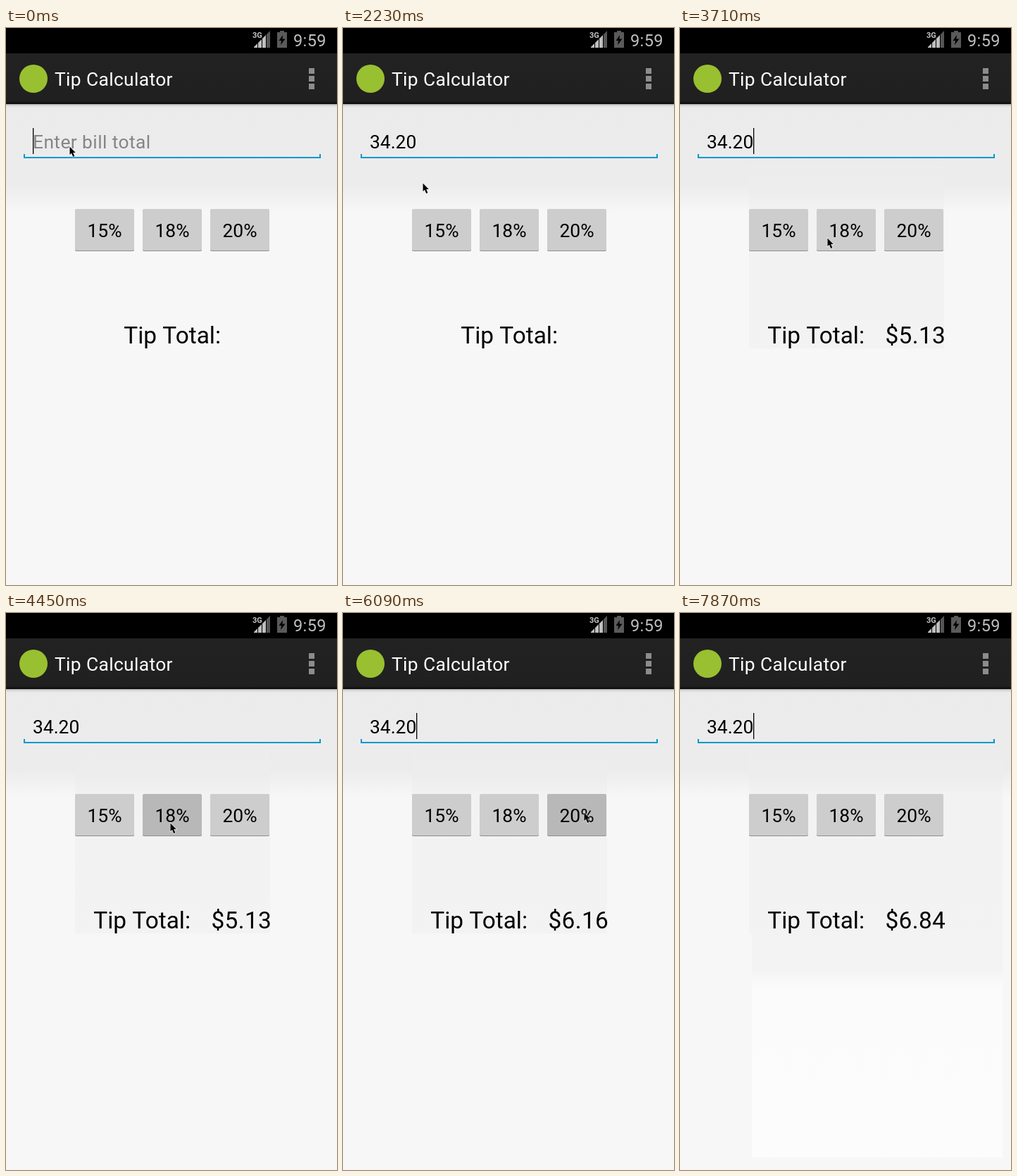
Recreate the animation shown at these times as an HTML page with a canvas. Size 470 by 791 pixels, loop 8370 ms.

```html
<!DOCTYPE html>
<html lang="en">
<head>
<meta charset="utf-8">
<title>Tip Calculator</title>
<style>
  html, body { margin: 0; width: 100%; height: 100%; overflow: hidden; background: #f7f7f7; }
  canvas { display: block; width: 470px; height: 791px; }
</style>
</head>
<body>
<canvas id="stage" width="470" height="791"></canvas>
<script>
const ctx = document.getElementById('stage').getContext('2d');
const LOOP = 8370, STEP = 148.55; // the screen refreshes once per step
const BILL = '34.20', RATES = [15, 18, 20];
const FIRST_PRESS = 19, PRESS_EVERY = 11;

// Pointer moves: start step, length, end point, easing power.
const START = { x: 90, y: 168 };
const MOVES = [
  { start: 13, len: 5, x: 147, y: 298, pow: 1 },
  { start: 24, len: 3, x: 233, y: 298, pow: 0.3 },
  { start: 34, len: 3, x: 342, y: 283, pow: 1.37 },
  { start: 45, len: 3, x: 438, y: 657, pow: 1 },
  { start: 49, len: 1, x: 448, y: 757, pow: 1 }
];
const LEAVE = 45, GONE = 51;

function pointerAt(step) {
  let { x, y } = START;
  for (const m of MOVES) {
    const p = Math.min(1, Math.max(0, (step - m.start) / m.len)) ** m.pow;
    x += (m.x - x) * p;
    y += (m.y - y) * p;
  }
  return { x: Math.round(x), y: Math.round(y) };
}

function typedAt(step) {
  if (step >= 12) return BILL;
  return BILL.slice(0, Math.max(0, Math.floor((step + 1) / 3)));
}

// The caret stays on while typing, then blinks in a cycle of seven steps.
const caretAt = step => step < 15 || (step - 15) % 7 >= 3;

function rect(color, x, y, w, h) {
  ctx.fillStyle = color;
  ctx.fillRect(x, y, w, h);
}

function roundRect(color, x, y, w, h, r) {
  ctx.fillStyle = color;
  ctx.beginPath();
  ctx.roundRect(x, y, w, h, r);
  ctx.fill();
}

function shade(y0, y1, ...stops) {
  const g = ctx.createLinearGradient(0, y0, 0, y1);
  for (const [y, color] of stops) g.addColorStop((y - y0) / (y1 - y0), color);
  return g;
}

function poly(points) {
  ctx.beginPath();
  points.forEach(([x, y]) => ctx.lineTo(x, y));
  ctx.closePath();
}

function setFont(size, spacing = 0, weight = 400) {
  ctx.font = `${weight} ${size}px Roboto, "Open Sans", sans-serif`;
  ctx.letterSpacing = spacing + 'px';
}

function text(str, x, y, color, align = 'left') {
  ctx.fillStyle = color;
  ctx.textAlign = align;
  ctx.fillText(str, x, y);
}

function drawPanel(left, right, bottom) {
  rect(shade(190, 791, [190, '#ececec'], [232, '#ededed'], [258, '#f2f2f2'],
    [505, '#f3f3f3'], [532, '#fbfbfb'], [791, '#fcfcfc']), left, 190, right - left, bottom - 190);
}

function drawBackground(step, pos) {
  rect(shade(108, 791, [108, '#ebebeb'], [222, '#ececec'], [262, '#f7f7f7'], [791, '#f7f7f7']),
    0, 108, 470, 683);
  if (step > FIRST_PRESS) drawPanel(98, 375, 455);
  if (step > LEAVE) drawPanel(102, pos.x + 10, pos.y + 16);
  rect(shade(108, 113, [108, '#aaaaaa'], [110, '#d8d8d8'], [113, '#ebebeb']), 0, 108, 470, 5);
}

function drawStatusBar() {
  rect('#000', 0, 0, 470, 36);
  setFont(11, 0, 700);
  text('3G', 350, 14, '#c4c4c4');
  for (let i = 0; i < 4; i++) {
    const x = 352 + i * 6, top = 27 - i * 6;
    ctx.fillStyle = i < 3 ? '#bebebe' : '#555';
    poly([[x, 28], [x, top], [x + 5, top - 5], [x + 5, 28]]);
    ctx.fill();
  }
  rect('#5a5a5a', 389, 4, 6, 3);
  rect('#5a5a5a', 385, 6, 14, 22);
  ctx.fillStyle = '#000';
  poly([[393, 10], [387.5, 18], [391, 18], [390, 24], [396.5, 15.5], [392.5, 15.5]]);
  ctx.fill();
  setFont(23.5, 0.4);
  text('9:59', 408, 26, '#bebebe');
}

function drawActionBar() {
  rect(shade(36, 108, [36, '#222222'], [104, '#202020'], [108, '#080808']), 0, 36, 470, 72);
  roundRect('#99c030', 19, 52, 40, 40, 20);
  setFont(26.4, 0.35);
  text('Tip Calculator', 69, 82, '#fff');
  for (let i = 0; i < 3; i++) rect('#8c8c8c', 430, 57 + i * 11, 8, 8);
}

function drawField(value, caretOn) {
  const blue = '#0099cc';
  rect(blue, 25, 183, 422, 2);
  for (const x of [25, 445]) rect(blue, x, 179, 2, 6);
  setFont(26.4, value ? 0 : 0.4);
  text(value || 'Enter bill total', 38, 171, value ? '#000' : '#858585');
  if (caretOn) {
    const x = 38 + (value ? Math.round(ctx.measureText(value).width) : 0);
    rect('#000', x, 142, 1.3, 37);
  }
}

function drawButtons(active) {
  RATES.forEach((rate, i) => {
    const x = 98 + i * 96;
    roundRect('#8e8e8e', x, 258, 84, 59, 2);
    roundRect(i === active ? '#b8b8b8' : '#cdcdcd', x, 257, 84, 59, 2);
    setFont(26.4);
    text(rate + '%', x + 42, 297, '#000', 'center');
  });
}

function drawTotal(rate) {
  setFont(33.4);
  text('Tip Total:', rate ? 124.3 : 167.3, 448, '#000');
  if (!rate) return;
  setFont(33.4, 0.4);
  text('$' + (BILL * rate / 100).toFixed(2), 291.4, 448, '#000');
}

function drawPointer({ x, y }) {
  ctx.save();
  ctx.translate(x, y);
  poly([[0.5, 0.5], [0.5, 12], [3, 9.8], [5.2, 15], [7.4, 14], [5.2, 9], [8.8, 9]]);
  ctx.strokeStyle = 'rgba(255,255,255,0.75)';
  ctx.lineWidth = 1.5;
  ctx.stroke();
  ctx.fillStyle = '#000';
  ctx.fill();
  ctx.restore();
}

function draw(t) {
  const step = Math.floor((t + 10) / STEP);
  const sincePress = step - FIRST_PRESS;
  const press = Math.min(RATES.length - 1, Math.floor(sincePress / PRESS_EVERY));
  const isDown = sincePress === press * PRESS_EVERY;
  const pos = pointerAt(step);

  drawBackground(step, pos);
  drawStatusBar();
  drawActionBar();
  drawField(typedAt(step), caretAt(step));
  drawButtons(isDown ? press : -1);
  drawTotal(RATES[isDown ? press - 1 : press]);
  if (step < GONE) drawPointer(pos);
}

const begin = performance.now();
function tick() {
  draw((performance.now() - begin) % LOOP);
  requestAnimationFrame(tick);
}
tick();
</script>
</body>
</html>
```
